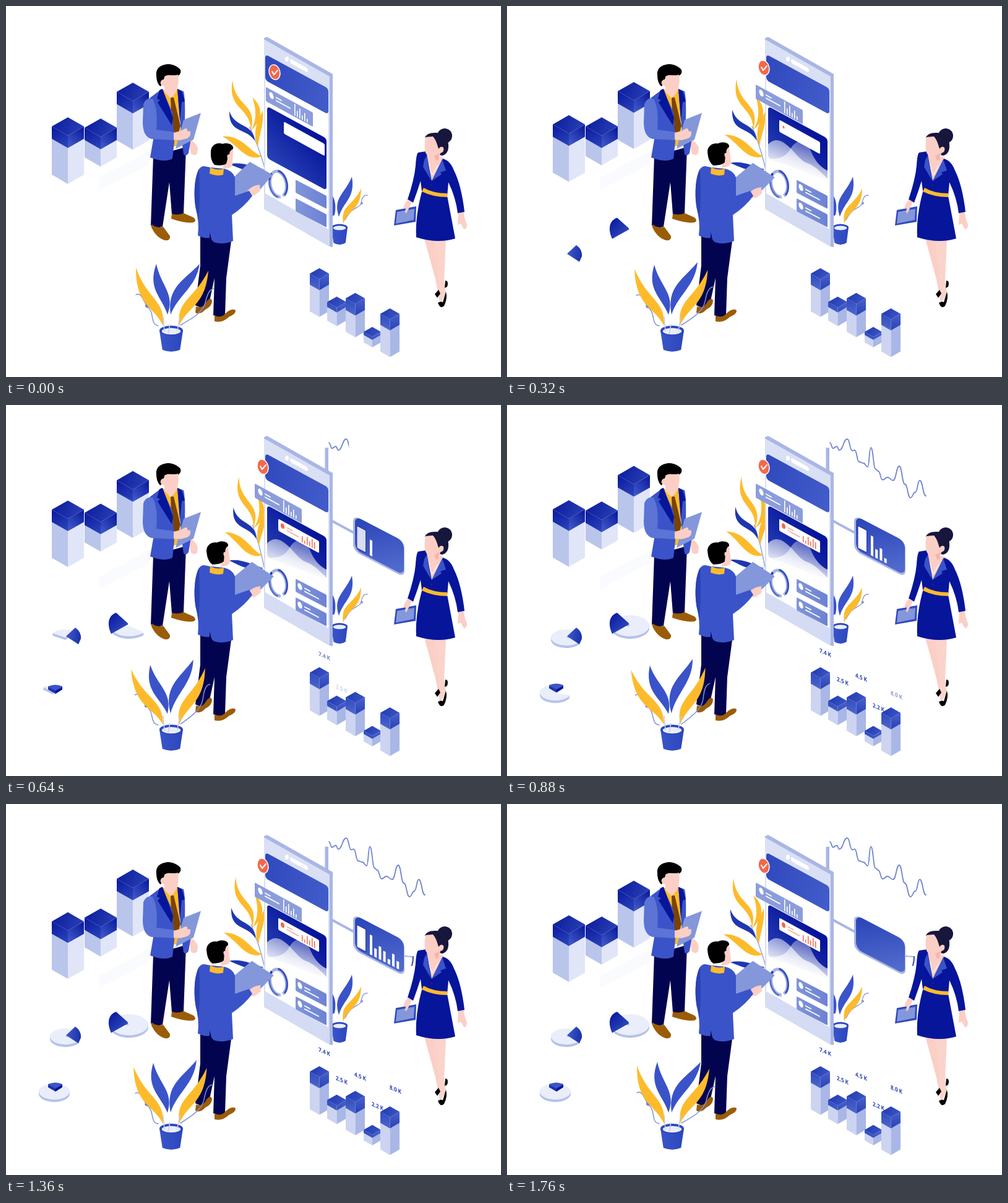
Recreate the animation shown at these times as an HTML page with a canvas. Size 800 by 600 pixels, loop 1.84 s.

```html
<!DOCTYPE html>
<html lang="en">
<head>
<meta charset="utf-8">
<title>Isometric dashboard team</title>
<style>
html, body { margin: 0; width: 100%; height: 100%; overflow: hidden; background: #fff; }
canvas { display: block; width: 800px; height: 600px; }
</style>
</head>
<body>
<canvas id="stage" width="800" height="600"></canvas>
<script>
const ctx = document.getElementById('stage').getContext('2d');
const LOOP = 1840, STEP = 80;
const NAVY = '#030450', DEEP = '#06159a', BLUE = '#3a53c9', SOFT = '#8497da', PALE = '#a9b6e5';
const MIST = '#d3daf3', SKIN = '#fbcfc6', GOLD = '#fdbb2b', BROWN = '#9b5c06', ORANGE = '#f4684b';

const clamp = v => Math.max(0, Math.min(1, v));
const span = (t, start, dur) => clamp((t - start) / dur);
const easeOut = p => 1 - (1 - p) ** 3;
const easeInOut = p => p < .5 ? 4 * p ** 3 : 1 - 4 * (1 - p) ** 3;

function shape(d, fill) {
  ctx.fillStyle = fill;
  ctx.fill(new Path2D(d));
}
function line(d, color, width = 1.5) {
  ctx.strokeStyle = color;
  ctx.lineWidth = width;
  ctx.stroke(new Path2D(d));
}
function grad(x0, y0, x1, y1, a, b) {
  const g = ctx.createLinearGradient(x0, y0, x1, y1);
  g.addColorStop(0, a);
  g.addColorStop(1, b);
  return g;
}
function oval(x, y, rx, ry, fill, tilt = 0) {
  ctx.fillStyle = fill;
  ctx.beginPath();
  ctx.ellipse(x, y, rx, ry, tilt, 0, 7);
  ctx.fill();
}
function rect(x, y, w, h, r, fill) {
  ctx.fillStyle = fill;
  ctx.beginPath();
  ctx.roundRect(x, y, w, h, r);
  ctx.fill();
}
function group(draw, alpha = 1) {
  if (alpha <= 0) return;
  ctx.save();
  ctx.globalAlpha *= alpha;
  draw();
  ctx.restore();
}
// A plane receding to the right: x runs downhill, y stays vertical.
function iso(x, y, draw, alpha = 1, slope = .545) {
  group(() => { ctx.transform(1, slope, 0, 1, x, y); draw(); }, alpha);
}
function spin(x, y, deg, draw) {
  group(() => {
    ctx.translate(x, y);
    ctx.rotate(deg * Math.PI / 180);
    ctx.translate(-x, -y);
    draw();
  });
}

function pillar(x, y, w, cap, tall, [top, left, right, stemLeft, stemRight]) {
  const h = w / 2, r = w * .285, m = x + h, e = x + w;
  const face = (a, from, to, fill) =>
    shape(`M${a} ${y + r + from}L${m} ${y + 2 * r + from}L${m} ${y + 2 * r + to}L${a} ${y + r + to}Z`, fill);
  face(x, cap, tall, stemLeft);
  face(e, cap, tall, stemRight);
  face(x, 0, cap, left);
  face(e, 0, cap, right);
  shape(`M${m} ${y}L${e} ${y + r}L${m} ${y + 2 * r}L${x} ${y + r}Z`, top);
}

function leftBars(t) {
  shape('M150 278L232 234L232 256L150 298Z', '#fafbfe');
  [[74, 180, 78, 125, 610, 970, 610], [127, 182, 48, 111, 780, 1015, 690], [179, 124, 78.5, 125, 920, 1040, 750]]
    .forEach(([x, y, tall, up, upDur, down, downDur]) => {
      const lift = 26 * (easeInOut(span(t, up, upDur)) - easeInOut(span(t, down, downDur)));
      const top = y - lift;
      pillar(x, top, 52, 20, tall, [
        grad(x, top, x + 52, top + 25, '#0a1a9d', '#2a42b5'),
        grad(x, top + 10, x + 26, top + 50, '#06149a', '#2c46bd'),
        grad(x + 26, top + 45, x + 52, top + 20, '#3f59c8', '#0c1c9e'), '#bac5ec', '#e0e6f8']);
    });
}

function rightBars(t) {
  [[491, 424, 31, 18, 61, '7.4 K', 505, 400], [519, 470, 31, 8, 30, '2.5 K', 533, 446],
   [549, 464, 31, 19, 54, '4.5 K', 563, 440], [578, 519, 28, 5, 17, '2.2 K', 591, 488],
   [605, 489, 31, 18, 61, '8.0 K', 620, 461]]
    .forEach(([x, y, w, cap, tall, label, tx, ty], i) => {
      pillar(x, y, w, cap, tall, [
        grad(x, y, x + w, y + 18, '#1f38b0', '#3e57c6'),
        grad(0, y + 8, 0, y + 38, '#2f49bd', '#5069cf'),
        grad(0, y + 8, 0, y + 38, '#4a62cb', '#2540b6'), '#ccd4f1', '#a9b7e6']);
      const p = span(t, 540 + 65 * i, 150);
      iso(tx, ty + 16 * (1 - p), () => {
        ctx.scale(.85, 1);
        ctx.font = 'bold 9.5px "Open Sans", sans-serif';
        ctx.fillStyle = '#2b45b9';
        ctx.fillText(label, 0, 0);
      }, p, .42);
    });
}

function disk(x, y, rx, ry, start, sweep) {
  if (sweep <= 0) return;
  const sector = (dy, fill) => {
    ctx.fillStyle = fill;
    ctx.beginPath();
    ctx.moveTo(x, y + dy);
    ctx.ellipse(x, y + dy, rx, ry, 0, start, start - sweep, true);
    ctx.fill();
  };
  for (let d = 4; d > 0; d--) sector(d, '#b6c2eb');
  sector(0, '#eaeefa');
}
function pies(t) {
  disk(199, 357, 31, 17, 2.6, 4.9 * span(t, 500, 360));
  disk(96, 376, 25, 13, -.9, 4.9 * span(t, 520, 350));
  disk(78, 465, 25, 13, -2.1, 5.3 * span(t, 620, 360));
  const rise = (start, draw) => group(() => {
    ctx.translate(0, 60 * (1 - span(t, start, 380)) ** 3);
    draw();
  }, span(t, start, 60));
  rise(120, () => {
    shape('M178 336L197 353L170 370C164 358 163 341 178 336Z', grad(168, 340, 192, 364, '#0b1b9e', '#2f49bf'));
    shape('M197 353L171 366L170 370L197 355Z', '#2741b6');
  });
  rise(230, () => {
    shape('M97 374L112 360Q122 367 121 378L117 387Z', grad(100, 376, 120, 378, '#3a54c6', '#1a32ad'));
  });
  rise(380, () => {
    shape('M68 453Q80 448 91 453L91 458L80 465L68 458Z', '#3b55c6');
    shape('M68 454L80 460L80 465L68 458Z', '#1b33ae');
    shape('M91 454L80 460L80 465L91 458Z', DEEP);
  });
}

function manFacing() {
  shape('M238 243L291 228L287 336Q277 341 268 337L264 285L253 357Q243 360 234 355Z', NAVY);
  shape('M235 353Q244 360 254 357L265 372Q266 380 257 379Q243 375 235 358Z', BROWN);
  shape('M268 336Q278 339 287 335L303 342Q309 347 303 350Q290 352 267 344Z', BROWN);
  shape('M295 215Q305 218 310 229L309 239Q304 243 299 239L297 228Z', SKIN);
  shape('M251 136L278 134L283 225L268 228Z', GOLD);
  shape('M266 148L271 148L282 194L276 214L268 203Z', '#7a4300');
  shape('M243 112C242 104 246 97 256 95C266 92 276 97 281 102C284 105 282 111 278 113L256 116L250 130C245 127 243 119 243 112Z', '#000');
  shape('M256 114C263 109 270 114 278 111C280 122 278 134 273 142L266 149L256 139L256 130Q248 128 250 122Q253 117 256 120Z', SKIN);
  shape('M277 134L287 138Q290 150 289 185L299 214L295 238Q291 244 287 240L284 218Z', BLUE);
  shape('M232 149L252 134L269 172L272 220L269 247Q256 254 233 245L239 210Z', BLUE);
  shape('M248 136L253 134L270 181L268 193L245 156L249 152L244 150Z', DEEP);
  shape('M277 134L284 138L289 154L284 156L281 186Z', DEEP);
  shape('M222 159Q226 147 237 150Q246 166 243 200L273 204L272 217L235 215Q221 211 221 188Z', '#5b74d5');
  shape('M287 184L315 173L303 216L274 231Z', SOFT);
  shape('M271 205L282 202L290 198Q294 198 293 202L298 203Q299 211 293 214L282 217L271 216Z', SKIN);
}

function manBehind(t) {
  const turn = easeInOut(span(t, 0, 300));
  shape('M314 368L364 380L356 440L354 500Q345 506 335 500L337 440L327 486Q316 490 306 484L314 420Z', NAVY);
  shape('M307 486Q318 490 324 478Q330 470 333 476Q333 486 322 491Q314 500 306 496Z', BROWN);
  shape('M337 500Q346 506 354 498Q364 488 371 492Q372 498 360 503Q350 513 337 510Z', BROWN);
  spin(370, 300, 4 * turn, () => shape('M364 281L394 252L431 273L407 301L370 308Z', SOFT));
  spin(342, 280, -9 * turn, () => {
    shape('M356 238Q362 232 367 231L366 257Q362 265 350 262Z', SKIN);
    shape('M331 236C331 224 342 220 350 223C359 220 369 225 367 231Q361 234 361 240Q356 239 358 247L356 255Q350 259 337 257Q330 250 331 236Z', '#000');
  });
  group(() => {
    ctx.translate(turn, 4 * turn);
    shape('M390 299Q398 290 410 289L411 299L402 306L395 307Z', SKIN);
  });
  shape('M320 259L330 261L352 263Q366 266 370 277L370 307L393 299L398 307Q386 324 365 338L367 380Q350 387 336 382L329 375Q318 376 310 371Q313 350 306 325Q302 290 310 267Q314 259 320 259Z', BLUE);
  shape('M312 264Q303 280 305 315L311 346Q314 315 312 264Z', '#2942b5');
  shape('M329 366L333 381L329 375Z', NAVY);
  shape('M330 261Q341 267 352 263L351 273Q340 276 329 271Z', GOLD);
}

function woman() {
  shape('M676 376L693 380L703 449L710 468L701 480L698 462L694 442Z', SKIN);
  shape('M692 379L711 379L708 446L711 463L702 480L700 450Z', '#fad4cb');
  shape('M699 459L702 465L697 472L693 466Z', '#000');
  shape('M710 444Q716 444 713 454L709 456Z', '#000');
  shape('M711 462Q714 473 708 485Q702 491 698 480Q703 477 706 479Z', '#000');
  shape('M731 334L740 334Q741 345 745 353Q745 361 740 361L735 352L730 354Z', SKIN);
  shape('M679 236L708 246L688 283Z', SKIN);
  shape('M666 237L679 235L688 283L706 247Q718 250 724 266Q736 290 741 333L730 335Q727 310 715 285L713 308Q690 308 672 299L670 283Q664 302 658 318L649 313Q660 280 662 258Q663 240 666 237Z', DEEP);
  shape('M680 242L676 249L674 260L687 282Z', BLUE);
  shape('M705 248L711 266L702 269L704 272L688 283Z', BLUE);
  line('M684 255Q685 267 689 273L698 258', '#fff', 1);
  shape('M673 297Q690 307 713 307L726 376Q698 385 663 374Q661 340 673 297Z', DEEP);
  shape('M675 294Q690 303 713 303L713 309Q690 309 672 300Z', GOLD);
  oval(688, 290, .8, .8, '#c21840');
  oval(709, 210, 12, 12, '#17163c');
  shape('M677 213Q680 204 696 205Q714 206 715 224Q716 239 705 242L697 240L692 216Z', '#17163c');
  shape('M678 212L690 211Q695 216 699 231Q703 225 707 229Q709 236 702 238L699 250L692 245Q681 244 678 237Q675 228 678 212Z', SKIN);
  shape('M692 242Q698 241 700 237L699 249L695 250Z', '#f3b4ac');
  shape('M630 330L663 324L662 349L627 355Z', '#2f49bd');
  shape('M632 333L660 328L659 346L630 352Z', SOFT);
  shape('M650 313L656 317Q652 326 647 335L645 334L646 327L642 328Q643 320 650 313Z', SKIN);
}

// A cubic spine from base to tip, widened on both sides.
function leaf(color, width, [x0, y0, x1, y1, x2, y2, x3, y3]) {
  const len = Math.hypot(x3 - x0, y3 - y0), d = width / 1.5 / len;
  const nx = (y0 - y3) * d, ny = (x3 - x0) * d;
  shape(`M${x0} ${y0}C${x1 + nx} ${y1 + ny} ${x2 + nx} ${y2 + ny} ${x3} ${y3}` +
    `C${x2 - nx} ${y2 - ny} ${x1 - nx} ${y1 - ny} ${x0} ${y0}Z`, color);
}
function pot(x, y, rx, h) {
  const b = rx * .75;
  shape(`M${x - rx} ${y}L${x + rx} ${y}L${x + b} ${y + h}Q${x} ${y + h + 6} ${x - b} ${y + h}Z`,
    grad(x - rx, y, x + rx, y, '#3a55c9', '#2c46bd'));
  oval(x, y, rx, rx * .42, '#2c47bd');
  oval(x, y + 1, rx * .8, rx * .27, '#e9edf9');
}

function frontPlant(sway) {
  spin(282, 515, -8 * sway, () => line('M282 516C300 506 318 496 322 480C326 463 330 458 336 457', '#7f92d9'));
  spin(255, 516, -3 * sway, () => {
    line('M246 517C232 515 241 495 228 486C220 472 218 463 210 467', '#7f92d9');
    oval(228, 485, 3, 3, '#6f84d3');
  });
  spin(265, 500, -9 * sway, () => {
    leaf(BLUE, 17, [261, 499, 263, 468, 239, 455, 243, 417]);
    leaf(BLUE, 17, [266, 499, 270, 460, 297, 450, 313, 417]);
  });
  pot(267, 525, 19, 31);
  spin(255, 516, -6.4 * sway, () => leaf(GOLD, 16, [254, 517, 248, 480, 219, 480, 210, 423]));
  spin(280, 516, -4.4 * sway, () => leaf(GOLD, 16, [280, 517, 285, 480, 313, 480, 327, 428]));
  line('M254 503L256 526M281 504L277 524M265 515L262 530', '#c3cdef', 1.5);
}

function sidePlant(sway) {
  spin(417, 250, 6 * sway, () => {
    line('M394 196Q408 226 418 262', '#8fa6de', 1.5);
    leaf(GOLD, 10, [396, 201, 401, 160, 364, 166, 366, 120]);
    leaf(GOLD, 8, [396, 201, 413, 182, 408, 160, 398, 148]);
    leaf(GOLD, 9, [407, 227, 404, 205, 411, 190, 415, 169]);
    leaf('#1e37b0', 10, [402, 218, 394, 192, 365, 203, 361, 170]);
    leaf(GOLD, 13, [414, 243, 392, 246, 378, 216, 350, 211]);
    leaf('#1e37b0', 9, [417, 264, 398, 266, 380, 257, 361, 256]);
  });
}

function backPlant() {
  line('M548 346C560 322 573 328 574 318Q576 305 584 306', '#7f92d9', 1.3);
  oval(575, 319, 2, 2, SOFT);
  shape('M527 306Q535 318 531 338L527 340Z', BLUE);
  leaf(BLUE, 14, [538, 341, 537, 312, 556, 308, 559, 276]);
  leaf(GOLD, 11, [545, 352, 547, 324, 567, 328, 574, 295]);
  pot(539, 358, 13, 25);
}

function monitor(t) {
  rect(515.5, 69, 5.5, 40, 0, PALE);
  const p = easeOut(span(t, 340, 300));
  if (p <= 0) return;
  const reach = Math.min(1, p * 1.3);
  line(`M526 187L${526 + 46 * reach} ${187 + 25 * reach}`, PALE, 4);
  iso(561 - 50 * (1 - p), 178 - 17 * (1 - p), () => {
    rect(0, 0, 83, 57.5, 10, PALE);
    rect(3, 0, 79, 54.5, 10, grad(10, 0, 50, 60, '#2a44b9', '#5069cc'));
    if (t >= 1760) return;
    group(() => {
      rect(5.5, 13, 15.5, 38, 1, '#1d36b0');
      rect(6.5, 14.5, 13.5, 35, 1, '#fff');
    }, span(t, 540, 120));
    [32, 14, 21, 17, 8, 20, 12].forEach((h, i) => {
      const g = h * easeOut(span(t, 540 + 100 * i, 240));
      if (g) rect(27 + i * 7.2, 51 - g, 4, g, 0, '#fff');
    });
  }, span(t, 340, 100), .52);
  if (t >= 1040) {
    line('M644 246L657 247', PALE, 2);
    line('M658 247Q658 255 656 261', '#2c46bb', 2);
  }
}

function lineChart(t) {
  const p = span(t, 580, 260);
  if (!p) return;
  const points = [[522, 62], [527, 70], [533, 67], [537, 73], [550, 55], [558, 74], [562, 73], [569, 92], [576, 94],
    [583, 100], [588, 69], [596, 104], [600, 107], [607, 121], [615, 117], [624, 122], [634, 99], [643, 128],
    [652, 150], [660, 141], [667, 122], [677, 147]];
  let d = 'M522 61';
  points.slice(1).forEach(([x, y], i) => {
    const [px, py] = points[i], m = (px + x) / 2;
    d += `C${m} ${py} ${m} ${y} ${x} ${y}`;
  });
  group(() => {
    ctx.beginPath();
    ctx.rect(515, 40, 170 * p, 120);
    ctx.clip();
    line(d, '#7185d1', 1.8);
  });
}

function miniCard(fill, detail) {
  oval(9, 9, 3.5, 5, fill, -.3);
  rect(16, 7, 10, 2, 1, fill);
  rect(16, 12, 24, 2, 1, fill);
  if (detail) [19, 10, 16, 7, 13, 6].forEach((h, i) => rect(46 + i * 4, 21 - h, 1.6, h, 0, fill));
}

function waves(alpha) {
  group(() => {
    ctx.beginPath();
    ctx.rect(421, 160, 98, 140);
    ctx.clip();
    shape('M420 226C430 214 440 215 450 223C464 233 472 249 485 254C498 258 510 272 520 281L520 310L420 260Z',
      grad(460, 215, 442, 268, 'rgba(255,255,255,.4)', '#fff'));
    shape('M420 246C440 250 452 243 460 228C470 214 482 217 490 232C498 252 508 262 520 267L520 310L420 260Z',
      grad(470, 220, 452, 282, 'rgba(255,255,255,.3)', '#fff'));
    shape('M420 247Q450 256 474 266Q500 277 520 281L520 310L420 260Z', '#fff');
  }, alpha);
}

function phone(t) {
  const slide = easeOut(span(t, 0, 300));
  shape('M417 52L422 50L528 110L528 390L523 389L417 328Z', PALE);
  shape('M417 54L523 114L523 389L417 328Z', grad(417, 60, 523, 390, '#dbe1f5', MIST));
  shape('M419 80L521 136L521 361L419 303Z', '#fff');
  oval(454, 86, 3, 4, '#fff');
  iso(459, 85, () => rect(0, 0, 29, 7, 3, '#fff'));
  iso(419, 78, () => rect(0, 0, 102, 42, 5, grad(0, 0, 102, 30, '#2f49be', '#425cca')));
  iso(422, 162, () => rect(0, 0, 96, 84, 5, grad(70, 0, 20, 90, '#06149a', '#2740b5')));
  waves(span(t, 80, 220));

  group(() => {
    ctx.translate(434 - 19 * slide, 107 - 7 * slide);
    oval(0, 0, 9.5, 13, '#fff', -.25);
    oval(0, 0, 8, 11.5, ORANGE, -.25);
    line('M-4 -1L-1 4L5 -3', '#fff', 2);
  });
  iso(420 - 18 * slide, 131 - 4 * slide, () => {
    rect(0, 0, 76, 23, 1.5, '#8c9ddb');
    miniCard('#fff', true);
  });
  iso(449 - 9 * slide, 187 - 3 * slide, () => {
    rect(0, 0, 66, 19.5, 2, '#fff');
    const dot = span(t, 240, 160);
    if (dot) oval(7, 8, 3 * dot, 4.2 * dot, ORANGE);
    group(() => {
      rect(14, 6, 9, 1.7, 0, '#f5a18f');
      rect(14, 10.5, 19, 1.7, 0, '#f5a18f');
      [10, 5, 13, 8, 14, 11].forEach((h, i) => rect(38 + i * 4, 17 - h, 1.5, h, 0, ORANGE));
    }, span(t, 340, 120));
  });
  [281, 311].forEach(y => iso(468, y, () => {
    rect(0, 0, 50, 21, 1.5, grad(0, 0, 50, 0, '#8195da', '#6c82d3'));
    ctx.translate(-2, 0);
    group(() => miniCard('#fff', false), span(t, 120, 160));
  }, 1, .52));

  const arc = (a, b, color, w, grow = 0) => {
    ctx.strokeStyle = color;
    ctx.lineWidth = w;
    ctx.beginPath();
    ctx.ellipse(440, 288, 13 + grow, 21 + grow, -.2, a, b);
    ctx.stroke();
  };
  ctx.lineCap = 'butt';
  arc(0, 7, '#a5b4e4', 5);
  arc(-1.3, 1.1, '#3750c1', 3, 1);
  arc(1.9, 3.6, '#5a72cf', 3, 1);
  arc(3.6, 4.2, '#142ca8', 3, 1);
  arc(1.3, 1.6, '#fff', 6);
  ctx.lineCap = 'round';
}

function render(t) {
  const sway = clamp(1 - Math.abs(t - 840) / 840);
  ctx.fillStyle = '#fff';
  ctx.fillRect(0, 0, 800, 600);
  ctx.lineCap = 'round';
  ctx.lineJoin = 'round';
  leftBars(t);
  pies(t);
  manFacing();
  sidePlant(sway);
  backPlant();
  if (t >= 400) {
    monitor(t);
    lineChart(t);
  }
  phone(t);
  manBehind(t);
  rightBars(t);
  woman();
  frontPlant(sway);
}

const began = performance.now();
function tick() {
  const t = (performance.now() - began) % LOOP;
  render(Math.floor(t / STEP) * STEP);
  requestAnimationFrame(tick);
}
tick();
</script>
</body>
</html>
```
